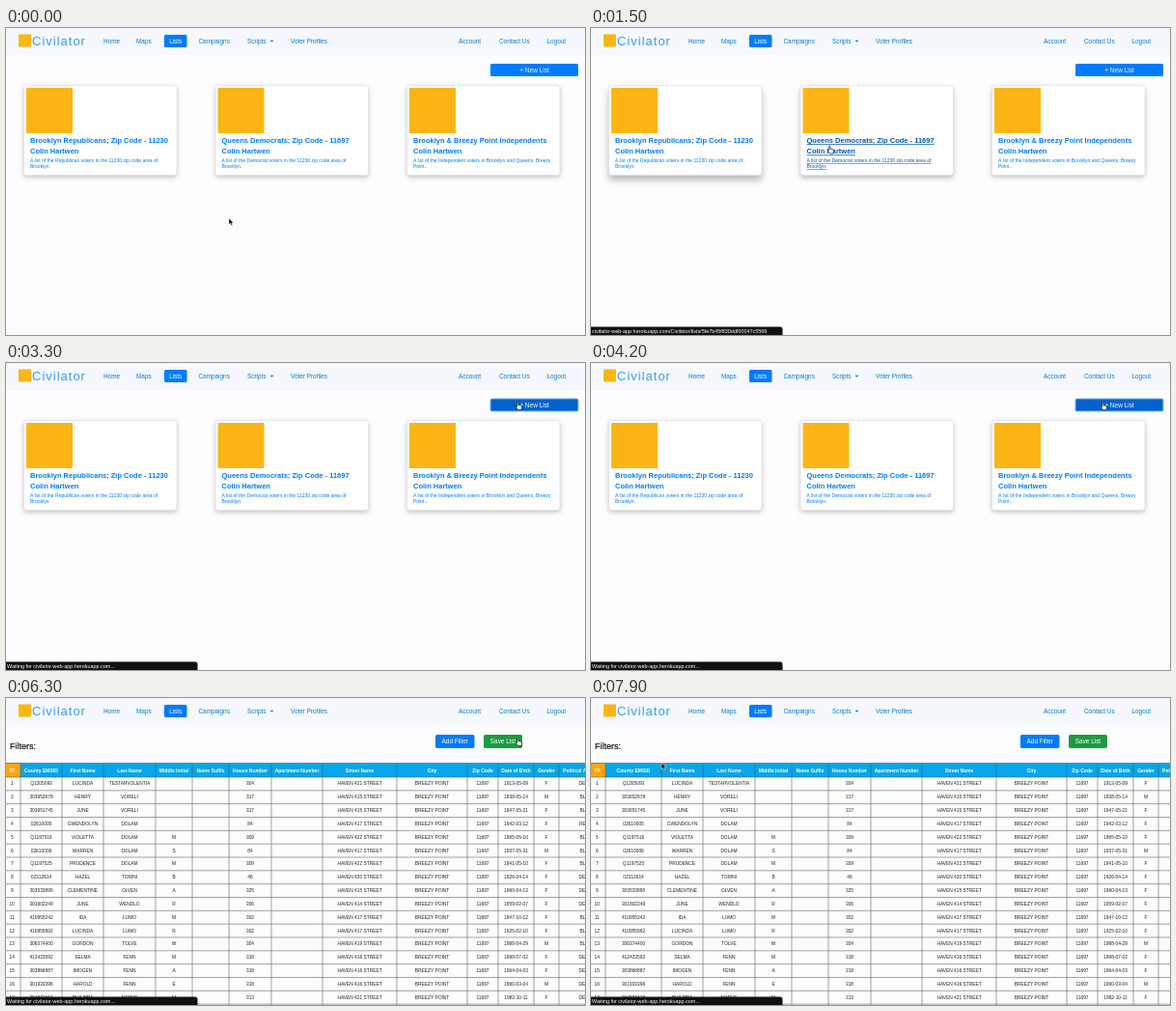
An HTML page for the animation above (8 s loop, 600 by 318 pixels).

```html
<!DOCTYPE html>
<html lang="en">
<head>
<meta charset="utf-8">
<style>
html, body { margin: 0; width: 100%; height: 100%; overflow: hidden; background: #fdfdff; }
svg { display: block; width: 600px; height: 318px; font-family: "Liberation Sans", Arial, sans-serif; }
text { white-space: pre; }
.link { fill: #007bff; }
.hover .link { fill: #0056b3; text-decoration: underline; }
</style>
</head>
<body>
<svg id="stage" viewBox="0 0 600 318"></svg>
<script>
const LOOP = 8000, TABLE_AT = 6200, REFLOW_AT = 6800, CLICK_AT = 3300;
const BLUE = '#007bff', ORANGE = '#fcb514';

const text = (x, y, s, size, fill, more = '') =>
  `<text x="${x}" y="${y}" font-size="${size}" fill="${fill}" ${more}>${s}</text>`;
const mid = (x, y, s, size, fill, more = '') => text(x, y, s, size, fill, 'text-anchor="middle" ' + more);
const rect = (x, y, w, h, fill, more = '') =>
  `<rect x="${x}" y="${y}" width="${w}" height="${h}" fill="${fill}" ${more}/>`;
const bold = 'font-weight="700"';

// Navigation bar
const navItems = [['Home', 101], ['Maps', 135], ['Campaigns', 199.5], ['Scripts', 250],
  ['Voter Profiles', 295], ['Account', 469], ['Contact Us', 511], ['Logout', 560.5]];
const nav = rect(0, 0, 600, 28, '#f5f9fd') + rect(13, 6.5, 13, 13, ORANGE) +
  text(27, 17.5, 'Civilator', 13, '#3c9ae6', 'letter-spacing="1"') +
  rect(164, 7, 23.5, 13, BLUE, 'rx="1.5"') + mid(175.7, 16, 'Lists', 6.4, '#fff') +
  navItems.map(([s, x]) => text(x, 16, s, 6.4, '#0b78d0')).join('') +
  '<path d="M273.5 12.8h4l-2 2z" fill="#0b78d0"/>';

// List page
const owner = 'Colin Hartwen';
const cards = [
  ['Brooklyn Republicans; Zip Code - 11230', 'A list of the Republican voters in the 11230 zip code area of', 'Brooklyn.'],
  ['Queens Democrats; Zip Code - 11697', 'A list of the Democrat voters in the 11230 zip code area of', 'Brooklyn.'],
  ['Brooklyn &amp; Breezy Point Independents', 'A list of the Independent voters in Brooklyn and Queens, Breezy', 'Point..']
];
const hovers = [[900, 1410], [1440, 2060], [2170, 2740]];

const card = ([title, line1, line2], i) => `<g class="card" transform="translate(${i * 198.5} 0)">` +
  rect(18.5, 59.5, 158.5, 93, '#fff', 'rx="3" stroke="#dcdce0" stroke-width=".6"') +
  rect(21, 62, 48, 47, ORANGE) +
  [[119.3, title, 7.5, bold], [130.4, owner, 7.5, bold], [139.2, line1, 5.04], [145, line2, 5.04]]
    .map(([y, s, size, w = '']) => text(25, y, s, size, BLUE, 'class="link" ' + w)).join('') + '</g>';

const listPage = cards.map(card).join('') +
  rect(502, 37, 91, 13, BLUE, 'rx="1.5" id="newList"') + mid(547.5, 45.8, '+ New List', 6.5, '#fff');

// Table page
const columns = [['ID', 0, 15], ['County EMSID', 15, 58], ['First Name', 58, 101], ['Last Name', 101, 155],
  ['Middle Initial', 155, 193], ['Name Suffix', 193, 231], ['House Number', 231, 275],
  ['Apartment Number', 275, 328], ['Street Name', 328, 405], ['City', 405, 478], ['Zip Code', 478, 510],
  ['Date of Birth', 510, 547], ['Gender', 547, 573], ['Political Affiliation', 573, 625]];

// county id, first, last, initial, house, street, birth, gender, party
const voters = `Q1205093,LUCINDA,TESTARVOLENTIA,,304,421,1913-05-09,F,DEM
303652678,HENRY,VORELI,,317,415,1938-05-14,M,BLK
303651745,JUNE,VORELI,,317,415,1947-05-21,F,BLK
02610005,GWENDOLYN,DOLAM,,84,417,1942-03-12,F,REP
Q1197516,VIOLETTA,DOLAM,M,309,422,1965-05-10,F,BLK
02610006,WARREN,DOLAM,S,84,417,1937-05-31,M,BLK
Q1197525,PRUDENCE,DOLAM,M,309,422,1941-05-10,F,BLK
02312614,HAZEL,TORINI,B,46,420,1926-04-14,F,DEM
303533895,CLEMENTINE,OLVEN,A,325,415,1960-04-13,F,DEM
301602249,JUNE,WENDLO,R,306,414,1959-02-07,F,DEM
410955242,IDA,LUMO,M,302,417,1947-10-12,F,BLK
410955992,LUCINDA,LUMO,R,302,417,1925-02-10,F,BLK
306374400,GORDON,TOLVE,W,304,419,1988-04-29,M,BLK
412423592,SELMA,FENN,M,318,416,1998-07-02,F,DEM
303866887,IMOGEN,FENN,A,318,416,1964-04-03,F,DEM
301933396,HAROLD,FENN,E,318,416,1960-03-04,M,DEM
304831610,PHILIPPA,NORVE,M,313,421,1982-10-11,F,DEM`.split('\n').map((line, i) => {
  const [id, first, last, initial, house, street, birth, gender, party] = line.split(',');
  return [i + 1, id, first, last, initial, '', house, '', `HAVEN ${street} STREET`, 'BREEZY POINT',
    '11697', birth, gender, party];
});

// The second column is wider by `grow`, pushing the rest to the right.
function table(grow) {
  const rowH = 13.83;
  let out = rect(0, 67.5, 600, 14.5, '#08a6ea') + rect(0, 67.5, 15, 14.5, '#fca510');
  let lines = 'M0 67.5H600M0 82H600';
  voters.forEach((_, r) => lines += `M0 ${82 + rowH * (r + 1)}H600`);
  columns.forEach(([name, left, right], c) => {
    const x0 = left + (c > 1 ? grow : 0), x1 = right + (c > 0 ? grow : 0), x = (x0 + x1) / 2 - (c ? 0 : 1.2);
    lines += `M${x1} 67.5V318`;
    out += mid(x, 76.6, name, 5.05, '#fff', bold);
    voters.forEach((v, r) => { if (v[c] !== '') out += mid(x, 90.4 + rowH * r, v[c], 4.85, '#222'); });
  });
  return out + `<path d="${lines}" fill="none" stroke="#555" stroke-width=".55"/>`;
}

const tablePage = text(4, 53, 'Filters:', 9, '#111', 'stroke="#111" stroke-width=".2"') +
  rect(445, 38, 40.5, 14, BLUE, 'rx="1.8"') + mid(465.3, 47.3, 'Add Filter', 6.4, '#fff') +
  rect(495, 38, 40, 14, '#1b9c41', 'rx="1.8"') + mid(515, 47.3, 'Save List', 6.4, '#fff') +
  `<g id="narrow">${table(0)}</g><g id="wide">${table(15)}</g>`;

// Browser status bar
const host = 'civilator-web-app.herokuapp.com';
const url = id => `${host}/Civilator/lists/${id}`;
const statuses = [[0, ''], [1100, url('5fe7b3e2830ddf00047c5568')], [1450, url('5fe7b45f830ddf00047c5569')],
  [2250, url('5fe7b4f6830ddf00047c556a')], [CLICK_AT, `Waiting for ${host}...`]];

const statusBar = '<g id="status"><path d="M0 309.5H196q2.5 0 2.5 2.5V318H0z" fill="#111"/>' +
  text(1, 315.6, '', 5.45, '#fff', 'id="statusText"') + '</g>';

const cursor = '<g id="cursor">' +
  '<path id="arrow" d="M0 0V6.6L1.5 5.3 2.6 7.8 3.8 7.3 2.7 4.9H4.7z" fill="#000" stroke="#fff" stroke-width=".5"/>' +
  '<path id="hand" d="M-.3 .6Q.4 -.3 1 .6V3L4 3.7Q4.8 4 4.6 5L4 8H.6L-1.8 4.9Q-1.6 4 -.3 4.8z" ' +
  'fill="#fff" stroke="#111" stroke-width=".7"/></g>';

const stage = document.getElementById('stage');
stage.innerHTML = nav + `<g id="listPage">${listPage}</g><g id="tablePage">${tablePage}</g>` + statusBar + cursor;
const el = id => document.getElementById(id);
const show = (id, on) => el(id).setAttribute('display', on ? 'inline' : 'none');
const cardEls = [...document.querySelectorAll('.card')];

// Pointer path: time, x, y
const path = [[0, 231, 197], [600, 231, 197], [1000, 165, 130], [1350, 165, 124], [1500, 247, 122],
  [1950, 247, 122], [2300, 450, 115], [2600, 505, 100], [2800, 525.5, 47.5], [3200, 530, 40.5],
  [6500, 530, 41.5], [6900, 440, 75], [7200, 380, 85], [7700, 73, 67], [LOOP, 73, 67]];

const clamp = v => Math.max(0, Math.min(1, v));

function pointer(t) {
  const i = path.findIndex(p => p[0] > t);
  const [t0, x0, y0] = path[i - 1], [t1, x1, y1] = path[i];
  const k = (t - t0) / (t1 - t0), e = k * k * (3 - 2 * k);
  return [x0 + (x1 - x0) * e, y0 + (y1 - y0) * e];
}

function draw(now) {
  const t = now % LOOP, onTable = t >= TABLE_AT;
  show('listPage', !onTable);
  show('tablePage', onTable);
  show('narrow', t < REFLOW_AT);
  show('wide', t >= REFLOW_AT);

  let linked = false;
  hovers.forEach(([from, to], i) => {
    const over = t >= from && t < to;
    linked = linked || over;
    const lift = clamp((t - from) / 350) - clamp((t - to) / 350);
    cardEls[i].classList.toggle('hover', over);
    cardEls[i].firstChild.style.filter =
      `drop-shadow(0 ${2.5 + 4 * lift}px ${2.4 + 2 * lift}px rgba(0,0,0,${0.22 + 0.06 * lift}))`;
  });

  const pressed = t >= CLICK_AT, button = el('newList');
  button.setAttribute('fill', pressed ? '#0062cc' : BLUE);
  button.setAttribute('stroke', pressed ? '#7db8fb' : 'none');

  const status = statuses.filter(s => s[0] <= t).pop()[1];
  show('status', status);
  el('statusText').textContent = status;

  const [x, y] = pointer(t);
  const hand = linked || (t >= 2740 && x > 495 && y < 52);
  el('cursor').setAttribute('transform', `translate(${x} ${y})`);
  show('hand', hand);
  show('arrow', !hand);
}

function loop() {
  draw(performance.now());
  requestAnimationFrame(loop);
}
loop();
</script>
</body>
</html>
```
